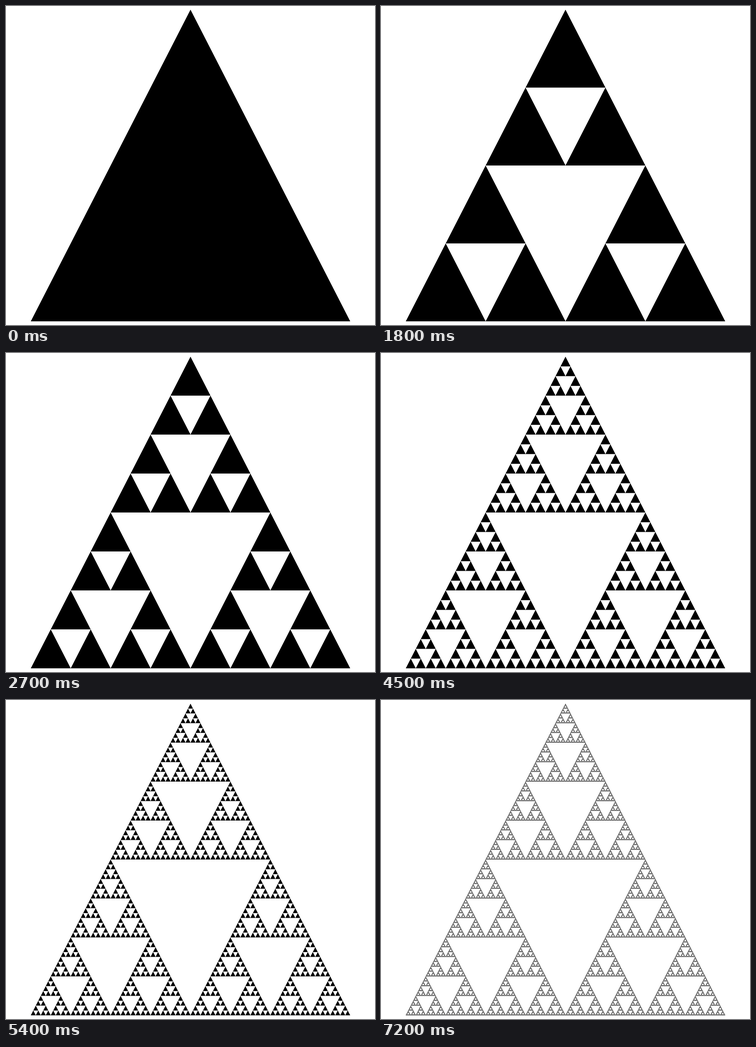
Animation, 804 px wide and 696 px high, one loop 8 s. Source, as an HTML page with a canvas:

```html
<!DOCTYPE html>
<html lang="en">
<head>
<meta charset="utf-8">
<title>Sierpinski triangle</title>
<style>
  html, body { margin: 0; width: 100%; height: 100%; overflow: hidden; background: #fff; }
  canvas { display: block; }
</style>
</head>
<body>
<canvas id="stage" width="804" height="696"></canvas>
<script>
const LOOP = 8000, STEP = 900;
const WIDTH = 696, HEIGHT = 680;
const ctx = document.getElementById('stage').getContext('2d');

// Adds the triangle with its apex at (x, y), split `depth` times.
function addTriangle(path, x, y, w, h, depth) {
  if (depth === 0) {
    path.moveTo(x, y);
    path.lineTo(x + w / 2, y + h);
    path.lineTo(x - w / 2, y + h);
    path.closePath();
    return;
  }
  w /= 2;
  h /= 2;
  addTriangle(path, x, y, w, h, depth - 1);
  addTriangle(path, x - w / 2, y + h, w, h, depth - 1);
  addTriangle(path, x + w / 2, y + h, w, h, depth - 1);
}

function draw(depth) {
  const path = new Path2D();
  addTriangle(path, 402, 8, WIDTH, HEIGHT, depth);
  ctx.fillStyle = '#fff';
  ctx.fillRect(0, 0, 804, 696);
  ctx.fillStyle = '#000';
  ctx.fill(path);
}

let shown = -1;
function tick() {
  const depth = Math.floor(performance.now() % LOOP / STEP);
  if (depth !== shown) draw(shown = depth);
  requestAnimationFrame(tick);
}
tick();
</script>
</body>
</html>
```
